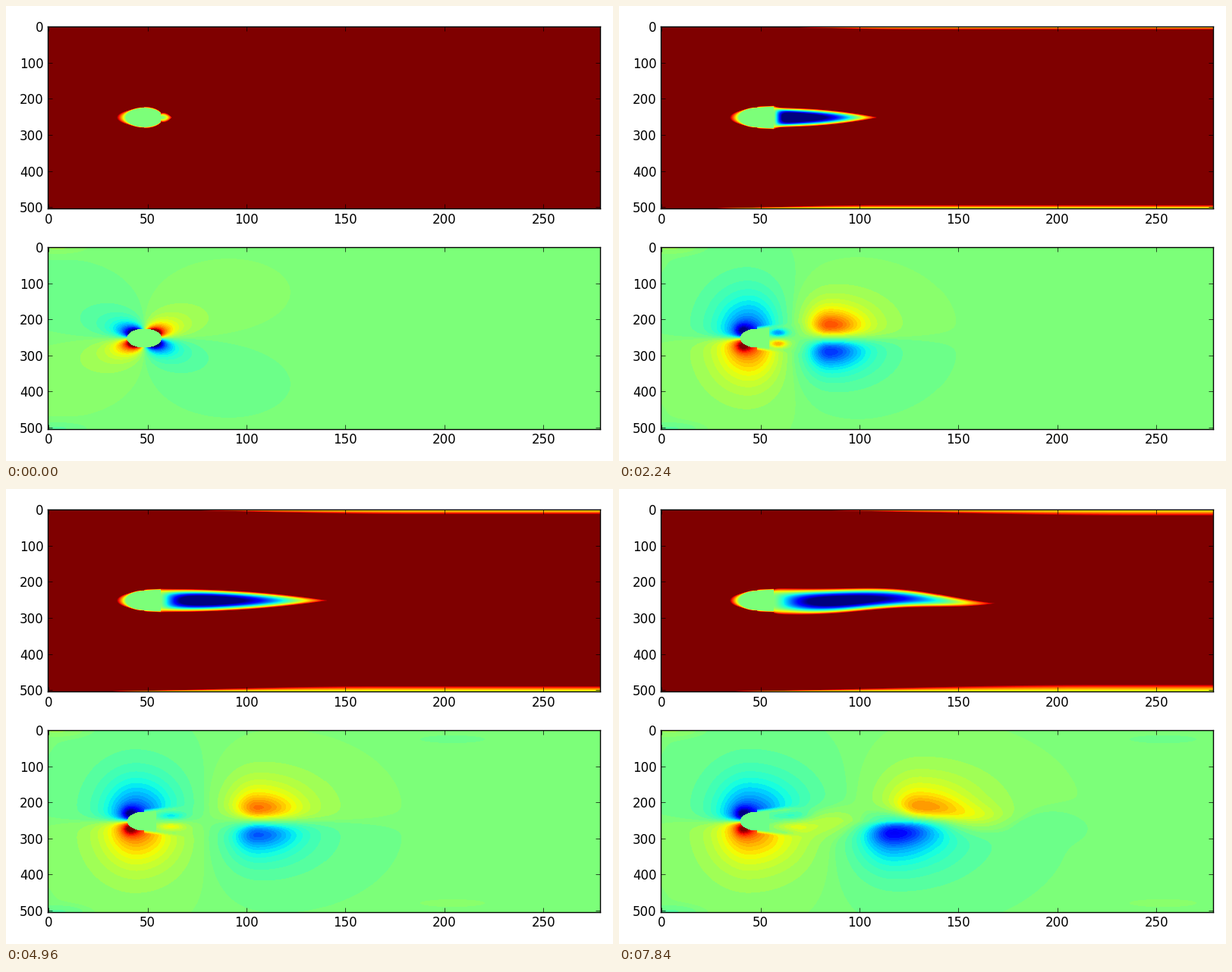
A matplotlib script that plays this animation: 800x600 px, repeating every 8000 ms.

```python
import numpy as np
import matplotlib.pyplot as plt
from matplotlib.animation import FuncAnimation

W, H, DPI = 800, 600, 100
FRAMES, STEP = 50, 160
LOOP = FRAMES * STEP
plt.rcParams["font.family"] = "DejaVu Sans"
plt.rcParams["font.size"] = 12

LEFT, RIGHT = 55, 782.5
PANELS = ((27, 267), (318, 557.5))
BODY_X, BODY_END = 182, 204

# Stage pixel coordinates, y measured from the axis of the flow.
x = np.linspace(LEFT, RIGHT, 727)[None, :]
y = np.linspace(-119.5, 119.5, 240)[:, None]
behind = np.clip(x - BODY_END, 0, None)


def smooth(s):
    s = np.clip(s, 0, 1)
    return s * s * (3 - 2 * s)


def bump(px, py, x0, y0, sx, sy):
    return np.exp(-((px - x0) / sx) ** 2 - ((py - y0) / sy) ** 2)


def lobe(px, py, x0, y0, sx, sy):
    return (1 + ((px - x0) / sx) ** 2 + ((py - y0) / sy) ** 2) ** -2.0


def grow(t, start, gain, power):
    return start + gain * (t / LOOP) ** power


def sway(t):
    """Growth of the instability that bends the wake."""
    return np.exp((t - LOOP) / 500)


def wake(t):
    """Streamwise speed behind the body."""
    tip = grow(t, 219, 282, .65)
    s = np.clip((x - BODY_END) / (tip - BODY_END), 0, 1)
    depth = smooth(t / 700)

    # Backflow sets in behind the body and recovers towards the tip.
    onset = 1 - np.exp(-(s / grow(t, .05, .1, 1)) ** 1.4)
    rise = s ** 2.1
    core = rise - 1.6 * depth * onset * (1 - rise)

    w0 = grow(t, 7.5, 10.3, .5)
    rim = 6 + 9.8 * depth
    width = w0 * (1 - s ** 2.2) + (rim - w0) * np.exp(-behind / 5)
    bend = sway(t) * (1.5 + 4 * s) * np.cos(2 * np.pi * (s - .1) / .85)
    power = 2 + 3 * depth * np.exp(-behind / 10)
    u = core + (1 - core) * (np.abs(y - bend) / np.maximum(width, .3)) ** power
    return np.where(x > tip, 1, u)


def body(t):
    """Streamwise speed around the obstacle."""
    dx, dy = (x - BODY_X) / 24, y / 12.4
    r = np.hypot(dx, dy)
    slope = .1 + .42 * (dx / np.maximum(r, .01)) ** 6
    nose = np.clip((r - 1) / slope, 0, 1)

    m = smooth(t / 700)
    oval = 12.4 * np.sqrt(np.clip(1 - dx ** 2, 0, 1))
    full = 12.4 + 1.4 * np.sqrt(np.clip((x - BODY_X) / 22, 0, 1))
    side = np.clip((np.abs(y) - (1 - m) * oval - m * full) / 1.9, 0, 1)
    return np.where(x < BODY_X, nose, side)


def walls(t):
    thick = grow(t, 0, 9.5, .55)
    reach = grow(t, 150, 420, 1)

    def layer(dist, start, scale):
        depth = scale * thick * smooth((x - start) / reach) + .01
        return .2 + .8 * (dist / depth) ** 1.2

    return np.minimum(layer(120 - y, 75, 1), layer(120 + y, 130, .9))


def stream(t):
    u = np.where(x < BODY_END, body(t), wake(t))
    return np.clip(np.minimum(u, walls(t)), -1, 1)


def dipole():
    """Potential flow past the ellipse."""
    dx, dy = (x - BODY_X) / 23, y / 12.5
    r2 = np.maximum(dx ** 2 + dy ** 2, .01)
    return np.where(r2 < 1, 0, -2.6 * dx * dy / r2 ** 2)


def half_plane(t, x0, extra):
    """Cross-stream speed on one side of the axis."""
    dist = np.abs(y)
    reach = np.where(x < 172, 59, grow(t, 40, 46, 1))
    front = (.6 * lobe(x, dist, 163, 10, np.where(x < 163, 14, 20), 12)
             + .5 * lobe(x, dist, 172, 12, reach, 62))

    sx = np.where(x < x0, .6, 1) * grow(t, 48, 50, .6)
    amp = .42 + extra + .35 * np.exp(-t / 2200)
    back = (amp * lobe(x, dist, x0, 14, sx, grow(t, 28, 30, .5))
            + .16 * bump(x, dist, x0, 17, .5 * sx, 14))

    shadow = smooth((x - 195) / 15) * smooth((x0 - x) / 40)
    soft = np.minimum(3 + .1 * np.abs(x - 160), 9) + 5 * shadow
    v = (back - front) * np.tanh(dist / soft)

    # Slow water inside the body and just behind it.
    gate = smooth((dist - 11 - .09 * (x - BODY_X)) / 6)
    gate = gate + (1 - gate) * smooth((x - 215) / 35)
    oval = ((x - BODY_X) / 22.5) ** 2 + (dist / 12.5) ** 2 > 1
    v = v * np.where(x < BODY_X, oval, gate)
    eddy = .7 * np.exp(-t / 5500) * np.tanh(dist / 3)
    spot = bump(x, dist, grow(t, 204, 20, 1), 7, grow(t, 8, 17, 1), 6)
    return v - np.where(x > 198, eddy * spot, 0)


def cross(t):
    x0, lead = grow(t, 198, 182, .66), 24 * sway(t)
    up = half_plane(t, x0 + lead, 0)
    down = half_plane(t, x0 - lead, .2 * sway(t))
    m = smooth(t / 800)
    v = (1 - m) * dipole() + m * np.where(y < 0, up, -down)

    # Wave along the axis once the wake turns unstable.
    wave = np.cos(2 * np.pi * (x - 268) / 205)
    v = v + .3 * sway(t) * wave * bump(x, y, 375, 0, 165, 18)

    # Inlet corners and faint drifting streaks along the walls.
    drift = .024 * smooth((t - 4200) / 700)
    far = 585 + (t - 4960) * .045
    for side in (-1, 1):
        v = v - side * .08 * bump(x, y, 68, side * 119, 32, 7)
        v = v + side * drift * bump(x, y, far, side * 108, 60, 7)
    return banded(v)


def banded(v, first=.012, step=.05):
    n = np.clip(np.ceil((np.abs(v) - first) / step), 0, 20)
    return np.where(n > 0, np.sign(v) * (first + step * (n - .5)), 0)


fig = plt.figure(figsize=(W / DPI, H / DPI), dpi=DPI, facecolor="white")


def panel(top, bottom):
    ax = fig.add_axes([LEFT / W, 1 - bottom / H,
                       (RIGHT - LEFT) / W, (bottom - top) / H])
    im = ax.imshow(np.zeros((240, 727)), cmap="jet", vmin=-1, vmax=1,
                   aspect="auto", interpolation="nearest",
                   extent=(-.5, 278.5, 503.5, -.5))
    ax.set_xticks(range(0, 251, 50))
    ax.set_yticks(range(0, 501, 100))
    ax.tick_params(direction="in", length=4, width=.5, pad=4,
                   top=True, right=True)
    for spine in ax.spines.values():
        spine.set_linewidth(1)
    return im


upper, lower = [panel(*p) for p in PANELS]


def draw(i):
    t = i * STEP
    upper.set_data(stream(t))
    lower.set_data(cross(t))
    return upper, lower


anim = FuncAnimation(fig, draw, frames=FRAMES, interval=STEP,
                     init_func=lambda: draw(0), repeat=True, repeat_delay=0)
plt.show()
```
